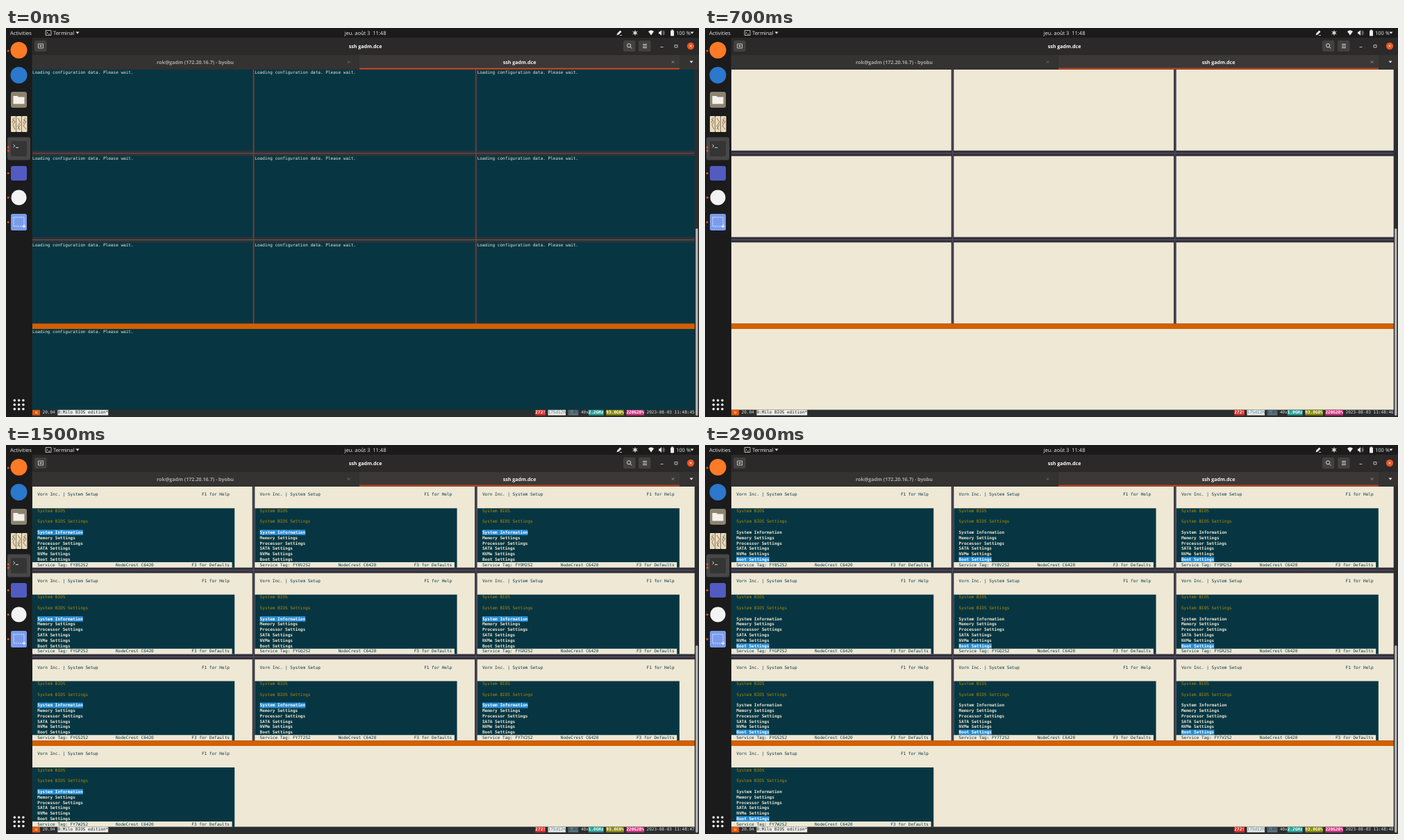
Animation, 998 px wide and 561 px high, one loop 3000 ms. Source, as an HTML page with a canvas:

```html
<!DOCTYPE html>
<html lang="en">
<head>
<meta charset="utf-8">
<title>Terminal panes</title>
<style>
html, body { margin: 0; width: 100%; height: 100%; overflow: hidden; background: #1b1b1b; }
canvas { display: block; }
</style>
</head>
<body>
<canvas id="stage" width="998" height="561"></canvas>
<script>
const ctx = document.getElementById('stage').getContext('2d');
const LOOP = 3000, TICK = 100;
const LEFT = 38, TOP = 60, CW = 3.64, RH = 7.79;
const DARK = '#073642', CREAM = '#eee8d5', ORANGE = '#e95420', YELLOW = '#b58900', BLUE = '#268bd2';
const MONO = '6.05px "DejaVu Sans Mono", monospace';
const SANS = '7.5px "Open Sans", sans-serif';
const TITLE = 'bold 7.1px "Open Sans", sans-serif';
const MENU = ['System Information', 'Memory Settings', 'Processor Settings',
  'SATA Settings', 'NVMe Settings', 'Boot Settings'];
const TAGS = ['FY8S2S2', 'FY8V2S2', 'FY9M2S2', 'FYGP2S2', 'FYGQ2S2', 'FYGR2S2',
  'FYGS2S2', 'FY7T2S2', 'FY7V2S2', 'FY7W2S2'];
// Panel cells already painted in each pane one second in
const PAINTED = [900, 900, 900, 779, 900, 900, 548, 900, 706, 849];
const EARLY = [1, 2, 7];

function rect(x, y, w, h, color, radius = 0) {
  ctx.fillStyle = color;
  ctx.beginPath();
  ctx.roundRect(x, y, w, h, radius);
  ctx.fill();
}
function circle(x, y, r, color) {
  ctx.fillStyle = color;
  ctx.beginPath();
  ctx.arc(x, y, r, 0, 7);
  ctx.fill();
}
function path(d, color, width) {
  const p = new Path2D(d);
  if (width) {
    ctx.strokeStyle = color;
    ctx.lineWidth = width;
    ctx.stroke(p);
  } else {
    ctx.fillStyle = color;
    ctx.fill(p);
  }
}
function text(s, x, y, color, font, align = 'left') {
  ctx.font = font;
  ctx.textAlign = align;
  ctx.fillStyle = color;
  ctx.fillText(s, x, y);
}
const arrow = (x, y) => path(`M${x - 2.5} ${y - 1}h5l-2.5 3z`, '#eee');
const cross = (x, y, r, color) =>
  path(`M${x - r} ${y - r}l${2 * r} ${2 * r}m0 ${-2 * r}l${-2 * r} ${2 * r}`, color, 0.8);

// Coordinates below are columns and rows relative to the current origin
const cells = (col, row, w, h, color) => rect(col * CW, row * RH, w * CW, h * RH, color);
const print = (s, col, row, color, bold) =>
  text(s, col * CW, (row + 0.73) * RH, color, (bold ? 'bold ' : '') + MONO);
function label(s, col, row, color, back, bold) {
  cells(col, row, s.length, 1, back);
  print(s, col, row, color, bold);
}

function drawTopBar() {
  rect(0, 0, 998, 14, '#1b1b1b');
  text('Activities', 6, 9.7, '#eee', SANS);
  path('M57 3.5h8v7h-8zM58.5 5.5l1.5 1.5l-1.5 1.5M61 8.8h2', '#ddd', 0.8);
  text('Terminal', 68, 9.7, '#eee', SANS);
  arrow(103, 6.5);
  text('jeu. août 3  11:48', 517.5, 9.7, '#eee', SANS, 'center');
  path('M879.5 10.5l1-3l4-4l2 2l-4 4z', '#eee');
  path('M884 10.5h3', '#eee', 0.8);
  circle(906, 7, 2.3, '#ddd');
  path('M902.5 5l7 4m0-4l-7 4M906 3v8', '#ccc', 0.9);
  path('M925 5q4-3.5 8 0l-4 5.5z', '#eee');
  path('M940 5.5h1.5l2.5-2.5v8l-2.5-2.5h-1.5z', '#eee');
  path('M945.5 4.5q2 2.5 0 5M947 3.5q2.5 3.5 0 7', '#bbb', 0.7);
  rect(957, 3.5, 5, 8, '#eee', 0.8);
  rect(958.5, 2.3, 2, 1.5, '#eee');
  text('100 %', 965, 9.7, '#eee', SANS);
  arrow(988, 6.5);
}

function drawWindow() {
  rect(37, 14, 961, 25, '#2b2929');
  for (const x of [41, 889, 911]) rect(x, 18, 17.5, 16, '#434040', 2.5);
  path('M46.5 23h7v6h-7zM50 24.3v3.4M48.3 26h3.4', '#ddd', 0.8);
  path('M899.7 25.3a2.6 2.6 0 1 1-5.2 0a2.6 2.6 0 1 1 5.2 0M899 27.2l2.3 2.3', '#eee', 0.9);
  path('M917 23.5h6M917 26h6M917 28.5h6', '#eee', 0.9);
  path('M942.5 27.5h4M963 24.5h4v3.5h-4z', '#ddd', 0.8);
  circle(986, 26, 5.2, ORANGE);
  cross(986, 26, 1.6, '#fff');
  text('ssh gadm.dce', 517.5, 28.6, '#fff', TITLE, 'center');

  rect(37, 39, 961, 21, '#353232');
  rect(509, 39, 461, 21, '#3b3837');
  text('rok@gadm (172.20.16.7) - byobu', 272.5, 51.5, '#aaa6a3', TITLE, 'center');
  text('ssh gadm.dce', 739.5, 51.5, '#f4f4f4', TITLE, 'center');
  cross(493.5, 49, 1.6, '#777');
  cross(960.5, 49, 1.6, '#aaa');
  arrow(987, 48.5);
  rect(509, 57.8, 461, 2, '#d8481c');
}

function drawDock() {
  rect(0, 14, 37.5, 547, '#1b1b1b');
  rect(2, 157.5, 33, 33, '#484747', 3);
  circle(18.5, 32, 12, '#ff7a26');
  circle(18.5, 68, 12, '#2b78cc');
  rect(7, 92, 23, 23, '#8c8371', 3);
  path('M10.5 98h6l1.5 1.5h8.5v10h-16z', '#f5f2ea');
  for (const x of [7, 15, 23]) rect(x, 127, 7.5, 23, '#e8dcbc', 1);
  path('M9 131l4 4l-3 5l3 6M17 130l4 6l-4 5l3 6M25 132l4 3l-4 6l4 5', '#a5573f', 0.9);
  path('M12 129l-3 8M21 139l-4 7M28 129l-3 9', '#68805a', 0.9);
  rect(7, 163, 23, 22, '#353535', 2);
  path('M10.5 168l2.3 2l-2.3 2M14 172.5h4', '#eee', 0.9);
  rect(7, 199, 23, 21, '#515bc0', 3);
  circle(18.5, 244.5, 11, '#f3f3f3');
  rect(7, 268, 23, 24, '#7b9cec', 2.5);
  ctx.setLineDash([1.5, 1.2]);
  path('M11 273h15v13h-15z', '#fff', 0.9);
  ctx.setLineDash([]);
  path('M26 283.5v5M23.5 286h5', '#fff', 1);
  for (const y of [33, 172, 177, 209.5, 244.5, 280]) circle(3.2, y, 1.5, ORANGE);
  for (let i = 0; i < 9; i++) circle(12.3 + i % 3 * 6.3, 537 + (i / 3 | 0) * 6.3, 1.8, '#eee');
}

function drawSetup(pane, t) {
  print('Vorn Inc. | System Setup', 2, 1, DARK);
  print('F1 for Help', 67, 1, DARK);
  const painted = Math.max(0, Math.min(880, PAINTED[pane] + (t - 1000) * 8));
  const rows = Math.floor(painted / 80), rest = painted % 80;
  cells(0, 4, 80, rows, DARK);
  cells(0, 4 + rows, rest, 1, DARK);
  if (pane === 9 && rest) cells(rest, 4 + rows, 1, 1, '#cfd6cf');
  if (t < 1000) return;
  print('System BIOS', 2, 4, YELLOW);
  print('System BIOS Settings', 2, 6, YELLOW);
  if (t < 1200) return;

  const chosen = Math.max(0, Math.min(5, Math.floor((t - 1500) / 200)));
  MENU.forEach((item, i) => {
    if (i === chosen) cells(2, 8 + i, item.length, 1, BLUE);
    print(item, 2, 8 + i, i === chosen ? '#fff' : CREAM, true);
  });
  if (pane === 9 && t >= 1700 && t < 2500 && t % 200 === 100)
    cells(2 + MENU[chosen].length, 8 + chosen, 1, 1, CREAM);
  if (t < 1300) return;
  cells(0, 14, 79, 1, CREAM);
  print('Service Tag: ' + TAGS[pane], 2, 14, DARK);
  print('NodeCrest C6420', 33, 14, DARK);
  print('F3 for Defaults', 63, 14, DARK);
}

function drawPane(pane, t) {
  const col = pane < 9 ? pane % 3 : 0, row = Math.floor(pane / 3);
  const early = EARLY.includes(pane);
  const light = t >= (early ? 600 : 700);
  ctx.save();
  ctx.translate(LEFT + col * 88 * CW, TOP + row * 16 * RH);
  cells(0, 0, pane === 9 ? 262 : col === 2 ? 86 : 87, 15, light ? CREAM : DARK);
  if (t < (early ? 400 : 500)) print('Loading configuration data. Please wait.', 0, 0, CREAM);
  else if (!light && pane === 9) cells(0, 0, 1, 1, CREAM);
  if (t >= 900) drawSetup(pane, t);
  ctx.restore();
}

function drawStatus(t) {
  const second = 45 + Math.floor((t + 700) / 1000);
  const speed = t >= 300 && t < 2600 ? '1.0GHz' : '2.2GHz';
  ctx.save();
  ctx.translate(LEFT, TOP + 63 * RH);
  cells(0, 0, 262, 1, '#2a2d2e');
  label(' u ', 0, 0, '#fff', '#e65a0a');
  print('20.04', 4, 0, '#ddd');
  label('0:Milo BIOS edition*', 10, 0, '#222', '#eeeeea');
  label('272!', 199, 0, '#fff', '#dc322f', true);
  label('175d12h', 204, 0, '#378bb0', '#eee8e0');
  label('1.07', 212, 0, '#24363d', '#5d747c');
  print('40x', 217, 0, '#ddd');
  label(speed, 220, 0, '#fff', '#2aa198', true);
  label('93.8G8%', 227, 0, '#fff', '#8d8c0c', true);
  label('220G28%', 235, 0, '#fff', '#d33682', true);
  print('2023-08-03 11:48:' + second, 243, 0, '#ddd');
  ctx.restore();
}

function drawTerminal(t) {
  rect(37.5, 59.8, 960.5, 501.2, '#2b2d2f');
  const band = t < 700 ? '#2d3337' : '#33313c', line = t < 700 ? '#7b5058' : '#5c5666';
  rect(LEFT, TOP, 262 * CW, 47 * RH, band);
  for (let pane = 0; pane < 10; pane++) drawPane(pane, t);
  for (const row of [15.5, 31.5]) rect(LEFT, TOP + row * RH - 0.4, 262 * CW, 0.9, line);
  for (const col of [87.5, 175.5]) rect(LEFT + col * CW - 0.4, TOP, 0.9, 47 * RH, line);
  rect(LEFT, TOP + 47 * RH, 262 * CW, RH, '#d45f00');
  rect(993.2, 289, 3.2, 270, '#b9b9b7', 1.6);
  drawStatus(t);
}

function frame(now) {
  const t = Math.floor(now % LOOP / TICK) * TICK;
  ctx.textRendering = 'geometricPrecision';
  drawTopBar();
  drawWindow();
  drawDock();
  drawTerminal(t);
  requestAnimationFrame(frame);
}
requestAnimationFrame(frame);
</script>
</body>
</html>
```
